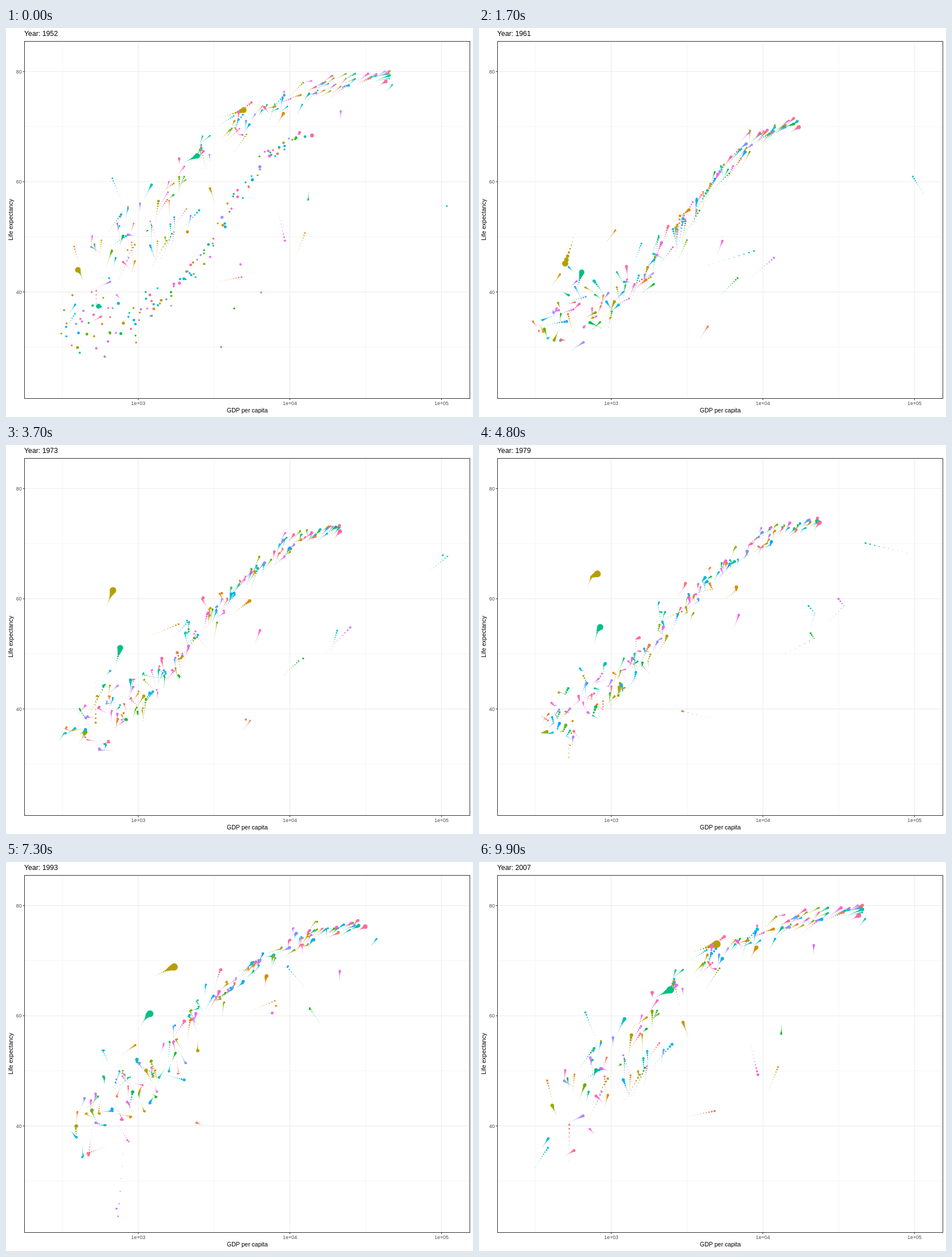
An HTML page with a canvas for the animation above (10 s loop, 820 by 683 pixels).

```html
<!DOCTYPE html>
<html lang="en">
<head>
<meta charset="utf-8">
<title>Life expectancy and GDP</title>
<style>
html, body { margin: 0; width: 100%; height: 100%; overflow: hidden; background: #fff; }
canvas { display: block; }
</style>
</head>
<body>
<canvas id="stage" width="820" height="683"></canvas>
<script>
const ctx = document.getElementById('stage').getContext('2d');
const COUNT = 142, FRAMES = 100, WAKE = 10, FIRST = 1952, SPAN = 55;
const LEFT = 32.5, TOP = 23.5, RIGHT = 814.5, BOTTOM = 650.5;
const dots = [];

let seed = 11;
const rnd = () => (seed = seed * 16807 % 2147483647) / 2147483647;
const spread = () => rnd() + rnd() + rnd() - 1.5;
const mix = (a, b, f) => a + (b - a) * f;
const px = logGdp => 232.2 + 266.25 * (logGdp - 3);
const py = life => 850.3 - 9.6725 * life;

// Evenly spaced hues of constant lightness and chroma (polar LUV).
function hueColor(i) {
  const h = (15 + 360 * (i - 1) / COUNT) * Math.PI / 180, L = 65, C = 100;
  const u = C * Math.cos(h) / (13 * L) + 0.1978, v = C * Math.sin(h) / (13 * L) + 0.4683;
  const Y = ((L + 16) / 116) ** 3, X = Y * 9 * u / (4 * v), Z = Y * (12 - 3 * u - 20 * v) / (4 * v);
  const channel = c => {
    c = Math.min(1, Math.max(0, c));
    return Math.round(255 * (c > 0.0031308 ? 1.055 * c ** (1 / 2.4) - 0.055 : 12.92 * c));
  };
  return `rgb(${channel(3.2406 * X - 1.5372 * Y - 0.4986 * Z)},${
    channel(-0.9689 * X + 1.8758 * Y + 0.0415 * Z)},${
    channel(0.0557 * X - 0.204 * Y + 1.057 * Z)})`;
}

// i sets the hue; population in millions at both ends; path holds [u, log gdp, life].
function addDot(i, pop0, pop1, path) {
  dots[i] = { color: hueColor(i), pop0, pop1, path };
}

// Key points as [year, gdp, life].
function track(i, pop0, pop1, ...keys) {
  addDot(i, pop0, pop1, keys.map(([year, gdp, life]) =>
    [(year - FIRST) / SPAN, Math.log10(gdp), life]));
}

function at(path, u) {
  let i = 1;
  while (i < path.length - 1 && path[i][0] < u) i++;
  const a = path[i - 1], b = path[i], f = (u - a[0]) / (b[0] - a[0]);
  return [mix(a[1], b[1], f), mix(a[2], b[2], f)];
}

// Life expectancy follows wealth along an S-curve that rises over time.
function typicalLife(x, u) {
  const low = mix(34, 40, u), high = mix(71, 81, u);
  const middle = mix(3.55, 3.24, u), width = mix(0.2, 0.4, u);
  return low + (high - low) / (1 + Math.exp((middle - x) / width));
}

// rank runs from the poorest (0) to the richest (1).
function addTypical(i, rank) {
  const endRank = Math.min(1, Math.max(0, rank + 0.15 * spread()));
  const offset = 6 * spread() * (1.1 - rank);
  const lateLoss = rank < 0.45 && rnd() < 0.3 ? 9 : 0;
  const pop = 1 + 60 * rnd() ** 4;
  const path = Array.from({ length: 12 }, (_, k) => {
    const u = k / 11, growth = u + 0.08 * Math.sin(2 * Math.PI * u);
    const x = mix(2.5 + 1.6 * rank, 2.6 + 2.05 * endRank, growth);
    const loss = lateLoss * Math.max(0, Math.sin((u - 0.6) * 5));
    const calm = 1.2 - rank;
    return [u, x + 0.08 * spread() * calm, typicalLife(x, u) + offset - loss + 1.6 * spread() * calm];
  });
  addDot(i, pop, pop * mix(2.6, 1.3, rank), path);
}

// The dots that leave the crowd
track(25, 556, 1319, [1952, 400, 44], [1957, 576, 50.5], [1962, 488, 44.5], [1967, 613, 58.4], [1977, 741, 64], [1992, 1656, 68.7], [2007, 4959, 73]);
track(59, 372, 1110, [1952, 547, 37.4], [1967, 700, 47.2], [1977, 813, 54.2], [1992, 1164, 60.2], [2007, 2452, 64.7]);
track(135, 158, 301, [1952, 13990, 68.4], [1967, 19530, 70.8], [1982, 25010, 74.7], [2007, 42952, 78.2]);
track(15, 57, 190, [1952, 2109, 50.9], [1977, 6660, 61.5], [1992, 6950, 67], [2007, 9066, 72.4]);
track(72, 0.2, 2.5, [1952, 108382, 55.6], [1957, 113523, 58], [1967, 80895, 64.6], [1972, 109348, 67.7], [1982, 31354, 71.3], [2007, 47307, 77.6]);
track(108, 2.5, 9, [1952, 493, 40], [1982, 882, 46.2], [1987, 848, 44], [1992, 737, 23.6], [1997, 590, 36.1], [2007, 863, 46.2]);
track(19, 5, 14, [1952, 368, 39.4], [1967, 523, 45.4], [1977, 525, 31.2], [1982, 624, 51], [2007, 1714, 59.7]);
track(46, 0.4, 1.5, [1952, 4293, 37], [1972, 11402, 48.7], [1977, 21746, 52.8], [1992, 13522, 61.4], [2007, 13206, 56.7]);
track(76, 1, 6, [1952, 2388, 42.7], [1967, 18773, 50.2], [1977, 21951, 57.4], [1992, 9640, 68.8], [2007, 12057, 74]);
track(110, 4, 28, [1952, 6460, 39.9], [1967, 16903, 49.9], [1977, 34168, 58.7], [1987, 21198, 66.3], [2007, 21655, 72.8]);
track(4, 4, 12, [1952, 3521, 30], [1972, 5473, 37.9], [1977, 3009, 39.5], [1997, 2277, 40.9], [2007, 4797, 42.7]);
track(14, 0.4, 1.6, [1952, 851, 47.6], [1967, 1215, 53.3], [1992, 7954, 62.7], [2002, 11004, 46.6], [2007, 12570, 50.7]);
track(118, 14, 44, [1952, 4725, 45], [1987, 7826, 60.8], [1997, 7479, 60.2], [2007, 9270, 49.3]);

// The crowd: one dot for every free hue, ranks shuffled by a stride.
for (let i = 1; i <= COUNT; i++)
  if (!dots[i]) addTypical(i, (i * 89 % COUNT + 0.5) / COUNT);

function line(x0, y0, x1, y1, color, width) {
  ctx.strokeStyle = color;
  ctx.lineWidth = width;
  ctx.beginPath();
  ctx.moveTo(x0, y0);
  ctx.lineTo(x1, y1);
  ctx.stroke();
}

function text(str, x, y, size, color, align) {
  ctx.font = `${size}px "Liberation Sans", Arial, sans-serif`;
  ctx.fillStyle = color;
  ctx.textAlign = align;
  ctx.fillText(str, x, y);
}

function drawGrid() {
  ctx.fillStyle = '#fff';
  ctx.fillRect(0, 0, 820, 683);
  for (const g of [2.5, 3.5, 4.5, 3, 4, 5])
    line(px(g), TOP, px(g), BOTTOM, '#ebebeb', g % 1 ? 0.53 : 1.07);
  for (const l of [30, 50, 70, 40, 60, 80])
    line(LEFT, py(l), RIGHT, py(l), '#ebebeb', l % 20 ? 0.53 : 1.07);
}

function drawAxes(year) {
  ctx.strokeStyle = '#333';
  ctx.lineWidth = 1;
  ctx.strokeRect(LEFT, TOP, RIGHT - LEFT, BOTTOM - TOP);
  for (const g of [3, 4, 5]) {
    line(px(g), BOTTOM, px(g), BOTTOM + 2.75, '#333', 1.07);
    text(`1e+0${g}`, px(g), 662.3, 8.8, '#4d4d4d', 'center');
  }
  for (const l of [40, 60, 80]) {
    line(LEFT - 2.75, py(l), LEFT, py(l), '#333', 1.07);
    text(l, 27.6, py(l) + 3.2, 8.8, '#4d4d4d', 'right');
  }
  text('GDP per capita', 423.7, 675.4, 10.5, '#000', 'center');
  text(`Year: ${year}`, 32, 14, 12.3, '#000', 'left');
  ctx.save();
  ctx.translate(12.4, 336.6);
  ctx.rotate(-Math.PI / 2);
  text('Life expectancy', 0, 0, 10.5, '#000', 'center');
  ctx.restore();
}

function drawDots(u, scale) {
  for (const dot of dots) {
    if (!dot) continue;
    const [x, y] = at(dot.path, u);
    const size = 1 + 5 * Math.sqrt(mix(dot.pop0, dot.pop1, u) / 1319);
    ctx.fillStyle = dot.color;
    ctx.beginPath();
    ctx.arc(px(x), py(y), 1.06 * size * scale + 0.45, 0, 2 * Math.PI);
    ctx.fill();
  }
}

function draw(now) {
  const frame = Math.floor(now / 100) % FRAMES;
  drawGrid();
  // The wake wraps around the loop and shrinks with the cube of its age.
  for (let age = WAKE - 1; age >= 0; age--)
    drawDots((frame - age + FRAMES) % FRAMES / (FRAMES - 1), (1 - age / WAKE) ** 3);
  drawAxes(Math.round(FIRST + SPAN * frame / (FRAMES - 1)));
}

const start = performance.now();
function loop() {
  draw(performance.now() - start);
  requestAnimationFrame(loop);
}
loop();
</script>
</body>
</html>
```
